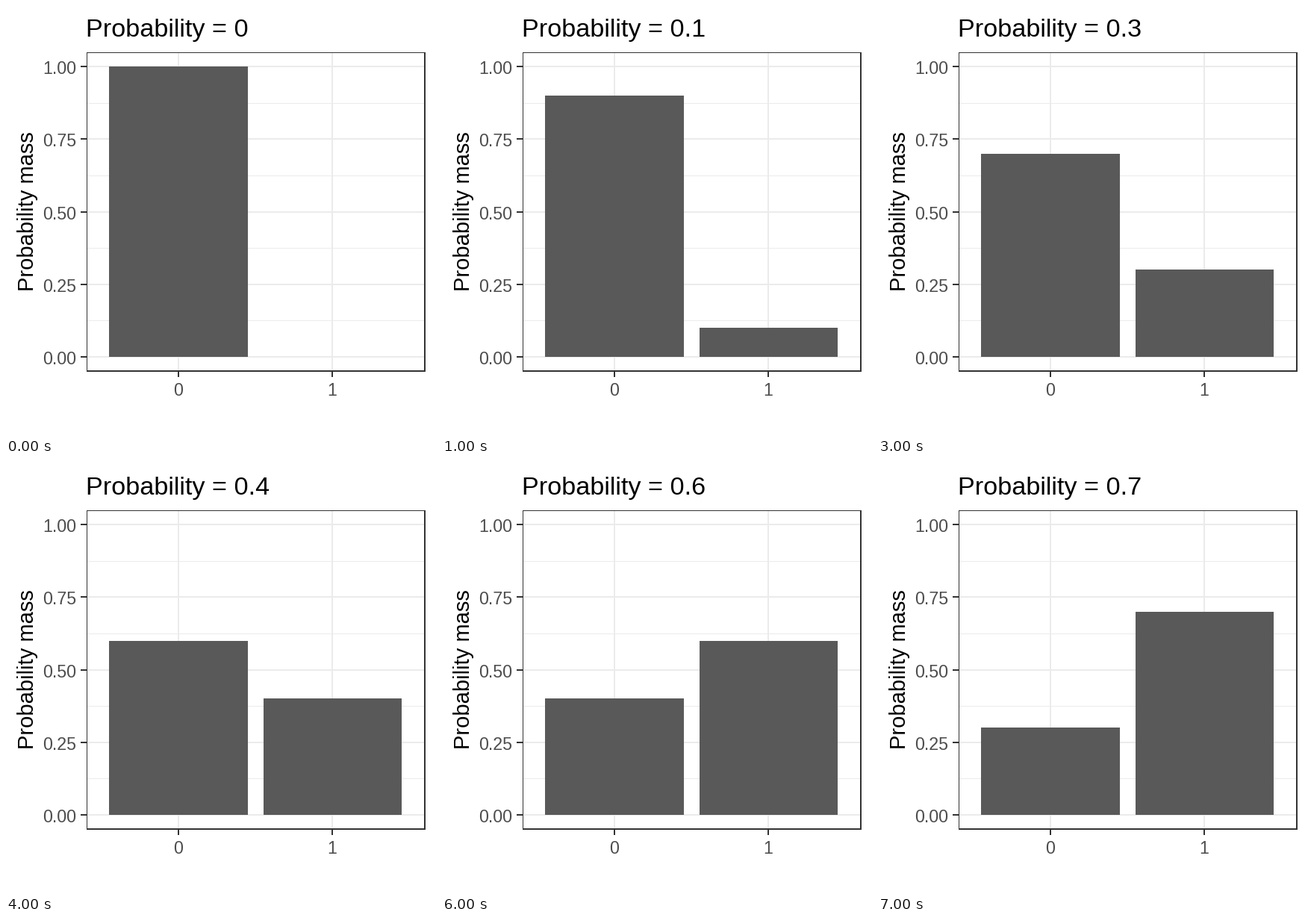
These frames come from a looping animation (576x576 px, 8 s). A matplotlib script:

```python
import matplotlib.pyplot as plt
from matplotlib.animation import FuncAnimation
from matplotlib.patches import Rectangle

SIZE = 576
STEPS = 8
LEFT, TOP, RIGHT, BOTTOM = 108, 62, 562, 490
Y_ZERO, Y_ONE = 470, 81
X_MID = (231, 437)
BAR_SPANS = ((138, 324), (345, 530))
GRID, FRAME, BAR, LABEL = "#EBEBEB", "#333333", "#595959", "#4D4D4D"

plt.rcParams["font.family"] = "Liberation Sans"
fig = plt.figure(figsize=(SIZE / 72, SIZE / 72), dpi=72, facecolor="white")
ax = fig.add_axes([0, 0, 1, 1])
ax.set_xlim(0, SIZE)
ax.set_ylim(SIZE, 0)
ax.axis("off")


def box(x0, y0, x1, y1, color, z=1):
    patch = Rectangle((x0, y0), x1 - x0, y1 - y0, facecolor=color,
                      linewidth=0, antialiased=False, zorder=z)
    return ax.add_patch(patch)


def label(x, y, text, size, color="black", **kw):
    return ax.text(x, y, text, fontsize=size, color=color,
                   va="baseline", **kw)


def level(value):
    return round(Y_ZERO + (Y_ONE - Y_ZERO) * value)


# Grid: thin lines halfway between the thick ones
for k in range(4):
    y = level(0.125 + 0.25 * k)
    box(LEFT, y, RIGHT, y + 1, GRID)
for k in range(5):
    y = level(0.25 * k)
    box(LEFT, y - 1, RIGHT, y + 1, GRID)
    box(LEFT - 8, y - 1, LEFT, y + 1, FRAME, 4)
    label(94, y + 10, f"{0.25 * k:.2f}", 23.3, LABEL, ha="right")
for k, x in enumerate(X_MID):
    box(x - 1, TOP, x + 1, BOTTOM, GRID)
    box(x - 1, BOTTOM, x + 1, BOTTOM + 7, FRAME, 4)
    label(x - 0.5, 522, str(k), 23.3, LABEL, ha="center")

# Panel border, heavier on the right and bottom
box(LEFT, TOP, RIGHT, TOP + 1, FRAME, 3)
box(LEFT, TOP, LEFT + 1, BOTTOM, FRAME, 3)
box(RIGHT - 2, TOP, RIGHT, BOTTOM, FRAME, 3)
box(LEFT, BOTTOM - 2, RIGHT, BOTTOM, FRAME, 3)

ax.text(37, 275.5, "Probability mass", fontsize=29.17, rotation=90,
        rotation_mode="anchor", ha="center", va="baseline")
title = label(107, 41, "", 34.2)
bars = [box(x0, Y_ZERO, x1, Y_ZERO, BAR, 2) for x0, x1 in BAR_SPANS]


def update(step):
    p = step / 10
    title.set_text(f"Probability = {p:g}")
    for bar, mass in zip(bars, (1 - p, p)):
        y = level(mass)
        bar.set_y(y)
        bar.set_height(Y_ZERO - y)
        bar.set_visible(mass > 0)
    return [title, *bars]


anim = FuncAnimation(fig, update, frames=STEPS, interval=1000, repeat=True)
plt.show()
```
